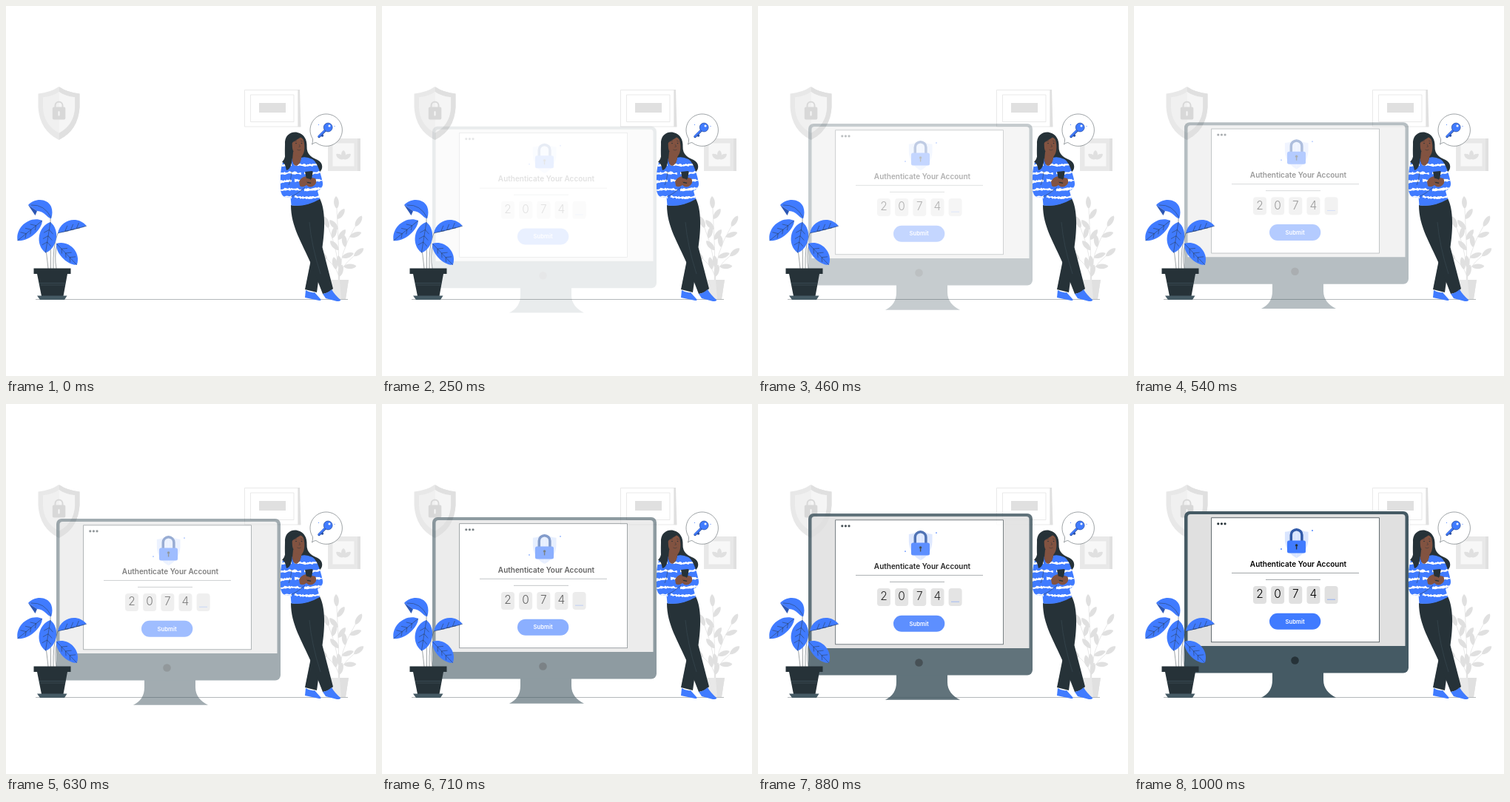
An HTML page that plays this animation: 500 px wide and 500 px high, repeating every 1040 ms.

```html
<!DOCTYPE html>
<html lang="en">
<head>
<meta charset="utf-8">
<title>Sign-in scene</title>
<style>
html, body { margin: 0; width: 100%; height: 100%; overflow: hidden; background: #fff; }
svg { display: block; width: 100%; height: 100%; }
text { font-family: Inter, "Open Sans", sans-serif; font-weight: 600; text-anchor: middle; }
.blue { fill: #407bff; }
.dark { fill: #263238; }
.slate { fill: #455a64; }
.skin { fill: #825341; }
.line { fill: none; stroke: #263238; stroke-width: .45; }
.grey { fill: #e0e0e0; }
.mist { fill: #e8e8e8; }
.pale { fill: none; stroke: #e0e0e0; stroke-width: .7; }
.dots { fill: none; stroke-linecap: round; }
</style>
</head>
<body>
<svg viewBox="0 0 500 500">
  <defs>
    <path id="half" d="M0 0Q12 8 28 9.500V28Q26 59 0 72Z"/>
    <g id="shield"><use href="#half"/><use href="#half" transform="scale(-1 1)"/></g>
    <path id="sweater" d="M377 208C370 214 371 232 371 247Q371 256 378 259L384.500 258L385.500 269.500Q405 272 424 261L421 250Q429 246 428 239C426 228 421 211 414 207Q405 203 399 205Q397 216 391 216Q387 213 387 206Z"/>
    <clipPath id="knit"><use href="#sweater"/></clipPath>
  </defs>

  <!-- wall shield -->
  <g transform="translate(71.500 109)">
    <use href="#shield" class="mist"/>
    <use href="#half" class="grey"/>
    <g transform="translate(0 7) scale(.77)">
      <use href="#shield" fill="#f0f0f0"/>
      <use href="#half" fill="#f5f5f5"/>
    </g>
    <path d="M-5 29V25.500a5 5 0 0 1 10 0V29" fill="none" stroke="#d8d8d8" stroke-width="2"/>
    <rect x="-8.700" y="27.500" width="17.500" height="17" rx="2" fill="#d8d8d8"/>
    <path d="M0 34V38.500" class="dots" stroke="#f5f5f5" stroke-width="2"/>
  </g>

  <!-- wall frames -->
  <path class="pale" d="M322.500 113.500H395V163H322.500ZM330.500 120H389V156.500H330.500Z"/>
  <path class="grey" d="M394.500 113H397L398.500 163.500H394.500ZM342 131H378V144H342Z"/>
  <path class="mist" d="M435 179H476V223H435Z"/>
  <path class="grey" d="M475 179H479V223H475Z"/>
  <path fill="#f7f7f7" d="M441.500 185.500H470.500V216.500H441.500Z"/>
  <g id="emblem" class="grey"></g>

  <!-- pale plant -->
  <g id="palePlant" class="grey"></g>
  <path class="mist" d="M437 370H463L459 396H441Z"/>
  <path class="grey" d="M451 370H463L459 396H453Z"/>

  <path d="M40 396.500H462" stroke="#263238" stroke-width=".35"/>

  <!-- computer -->
  <g id="computer">
    <path class="slate" d="M187 360H256V373C256 384 263 392 273 396.800H172C182 392 187 384 187 373Z"/>
    <rect class="slate" x="68" y="145" width="303" height="218.500" rx="7"/>
    <path class="grey" d="M72.500 327V153Q72.500 149 76.500 149H362.500Q366.500 149 366.500 153V327Z"/>
    <circle class="dark" cx="217.500" cy="346.500" r="5.300"/>
    <rect x="104.700" y="153.800" width="226.800" height="168" fill="#fff" stroke="#263238" stroke-width=".7"/>
    <path d="M113.800 161.800h.01m4.600 0h.01m4.600 0h.01" class="dots" stroke="#263238" stroke-width="3.200"/>
    <use href="#shield" fill="#d9e5ff" transform="translate(219.700 167.500) scale(.565)"/>
    <path d="M212.300 186V177a7.300 7.300 0 0 1 14.600 0V186" fill="none" stroke="#315aa8" stroke-width="3.500"/>
    <rect class="blue" x="207" y="184.500" width="25" height="17" rx="2.500"/>
    <path class="dark" d="M218.900 192.500h1.400v4h-1.400z"/>
    <circle class="dark" cx="219.600" cy="191" r="1.700"/>
    <path d="M241 171h.01M199 196h.01" class="dots" stroke="#407bff" stroke-width="1.800"/>
    <text x="222" y="219.600" font-size="10">Authenticate Your Account</text>
    <path class="line" d="M132 228.400H304M178 237.400H252"/>
    <g id="code"></g>
    <path d="M261 264.200H272" stroke="#407bff" stroke-width=".5"/>
    <rect class="blue" x="183" y="282.700" width="69.300" height="22" rx="11"/>
    <text x="217.600" y="296.500" font-size="7.700" fill="#fff">Submit</text>
  </g>

  <!-- blue plant -->
  <path class="line" d="M57 355Q56 345 54.500 333M60.500 355Q60 315 60 286M64 355Q63 325 70 307M68 355Q65 338 69 321"/>
  <path class="blue" d="M30 269C38 260 55 259 61 271Q64 279 61 287.500C55 286 52 277 42 277Z"/>
  <path fill="#2c56b3" d="M30 269L42 277L39.500 283Z"/>
  <path class="line" d="M34 269Q52 268 61 286"/>
  <g id="bluePlant" class="blue"></g>
  <path class="dark" d="M37.500 354.500H87.500V362H37.500ZM42 362H83L77.500 392H48Z"/>
  <path d="M45 374.500H80.500M45.500 377H80" stroke="#455a64" stroke-width=".6"/>
  <path class="slate" d="M42 391.500H82.500L79 397H46Z"/>

  <!-- woman -->
  <path class="dark" d="M404 383L413 338L428 328L420 387Z"/>
  <path class="dark" d="M385 269Q405 272 424 260C432 276 431 303 427.500 326L442 382Q436 388 428 389L412 348C400 320 385 298 385 269Z"/>
  <path d="M410 292Q413 325 425 362" fill="none" stroke="#455a64" stroke-width=".4"/>
  <path class="blue" d="M405 384Q411 388 417 387L425 396Q427 398 423 398L404 394ZM428 389Q435 388 440 383Q444 390 452 397Q453 399 447 399L432 395Z"/>
  <path class="dark" d="M377 187C376 175 385 169 394 171C403 173 407 181 406.500 190C406 201 414 205 421 208C429 212 429 221 423 225C414 229 406 222 399 213L385 214Q384 222 381 223Q376 216 377 187Z"/>
  <use href="#sweater" class="blue"/>
  <path id="stripes" fill="#fff" clip-path="url(#knit)"/>
  <path class="line" d="M385 258Q394 254 404 245M386 223Q385 236 382 242"/>
  <path class="dark" d="M377 190Q380 204 373 211Q377 211 379 222Q387 220 387 200Z"/>
  <path class="skin" d="M388 197L387 208Q388 215 392 216Q398 214 399 205L401 198Z"/>
  <path class="skin" d="M386.500 184C389 178 398 174 402 181C404.500 190 403.500 200 399 203.500C394 205 388 199 387 192Z"/>
  <path class="dark" d="M385 189C386 182 395 181 398 177Q391 174 386 179Z"/>
  <path class="line" d="M389.500 183L393 182M398 182L401 183M396 187L397.500 190L395.500 190.500M393.500 194Q396 196 398.500 194"/>
  <path d="M392 185.500h.01m7.500 0h.01" class="dots" stroke="#263238" stroke-width="1.500"/>
  <path class="skin" d="M396 237Q399 231 406 230L418 233Q421 238 417 242Q411 247 406 242Q401 246 397 243Z"/>
  <path class="dark" d="M404 224L413.500 223Q415 223 414.500 225L412 240L407 239Z"/>
  <path class="skin" d="M404 232L411 234L412 237L407 238ZM413 233L418 235L414 239L409 238Z"/>

  <!-- speech bubble -->
  <path d="M414.500 179.500A21.700 21.700 0 1 1 419 184.500Q416 184.500 413.500 187Q415 183 414.500 179.500Z" fill="#fff" stroke="#263238" stroke-width=".45"/>
  <path d="M432.500 167L423 176.500M426 173.500l1.500 1.500" class="dots" stroke="#2b51a5" stroke-width="3.400"/>
  <path d="M432 167L423 176" class="dots" stroke="#407bff" stroke-width="2.300"/>
  <circle class="blue" cx="435.200" cy="164" r="5.900" stroke="#2b51a5" stroke-width=".8"/>
  <circle cx="437" cy="162" r="1.500" fill="#fff"/>
  <path d="M422.500 160.500h.01M444 162.500h.01" class="dots" stroke="#407bff" stroke-width="1.200"/>
</svg>
<script>
const LOOP = 1040, RISE = 1000, LEAD = 25, DROP = 20;
const $ = id => document.getElementById(id);
const range = n => [...Array(n).keys()];

// Leaf along its own axis; the two widths bulge to either side
function leaf(x, y, angle, length, left, right, veined) {
  const a = length * .2, b = length * .8;
  const vein = i => {
    const at = length * (.25 + .2 * i);
    return `M${at} 0l5 ${-left * .4}M${at} 0l5 ${right * .4}`;
  };
  const veins = veined ? `<path class="line" d="M0 0H${length}${range(3).map(vein).join('')}"/>` : '';
  return `<g transform="translate(${x} ${y}) rotate(${angle})">
    <path d="M0 0C${a} ${-left} ${b} ${-left} ${length} 0C${b} ${right} ${a} ${right} 0 0"/>${veins}</g>`;
}

// Stem bending from the pot to a tip, with leaves on alternating sides
function branch(tipX, tipY, count) {
  const rootX = 450, rootY = 370, bendY = (rootY + tipY) / 2;
  const leaves = range(count).map(i => {
    const t = 1 - i * 14 / (rootY - tipY), s = 1 - t;
    const x = rootX + (tipX - rootX) * t * t;
    const y = s * s * rootY + 2 * s * t * bendY + t * t * tipY;
    const lean = Math.atan2(tipY - bendY, tipX - rootX) * 180 / Math.PI;
    const turn = i ? (i % 2 ? 38 : -38) : 0;
    return leaf(x, y, lean + turn, 17, 4.5, 4.5);
  }).join('');
  return `<path class="pale" d="M${rootX} ${rootY}Q${rootX} ${bendY} ${tipX} ${tipY}"/>${leaves}`;
}

$('palePlant').innerHTML =
  branch(447, 274, 5) + branch(472, 298, 5) + branch(470, 338, 3) + branch(434, 342, 2) + branch(436, 300, 2);
$('emblem').innerHTML = [-145, -90, -35].map(angle => leaf(456, 207, angle, 12, 4, 4)).join('');
$('bluePlant').innerHTML =
  leaf(49, 290, 141, 43, 10, 16, true) + leaf(60, 292, 99, 42, 15, 16, true) +
  leaf(70, 307, -14, 40, 17, 1, true) + leaf(68, 321, 46, 40, 16, 10, true);

$('code').innerHTML = [...'2074 '].map((digit, i) => {
  const x = 161 + i * 24.15;
  return `<rect class="grey" x="${x}" y="246" width="18" height="24" rx="4"/>
    <text x="${x + 9}" y="262.300" font-size="15.500" style="font-weight:300">${digit}</text>`;
}).join('');

// Ragged knit rows, each broken by a gap that shifts from row to row
let seed = 7;
const random = () => (seed = seed * 16807 % 2147483647) / 2147483647;
function stripe(x, y, width) {
  const upper = [], lower = [];
  for (let dx = 0; dx <= width; dx += 1.6) {
    const mid = y + Math.sin((x + dx) / 7);
    upper.push([x + dx, mid - .5 - 2 * random()]);
    lower.unshift([x + dx, mid + .5 + 1.5 * random()]);
  }
  return `M${upper.concat(lower).join('L')}Z`;
}
$('stripes').setAttribute('d', range(5).map(row => {
  const y = 214.5 + 11 * row, gap = 386 + 13 * (row % 2);
  return stripe(370, y + 1, gap - 370) + stripe(gap + 4, y, 426 - gap);
}).join(''));

// cubic-bezier(.42, 0, 1, 1)
function easeIn(x) {
  let low = 0, high = 1;
  for (let i = 0; i < 24; i++) {
    const s = (low + high) / 2;
    if (s * (1.26 + s * (.48 - .74 * s)) < x) low = s; else high = s;
  }
  return low * low * (3 - 2 * low);
}

const start = performance.now();
function draw(now) {
  const time = Math.max(0, now - start) % LOOP;
  const shown = easeIn(Math.min(1, (time + LEAD) / RISE));
  $('computer').setAttribute('opacity', shown);
  $('computer').setAttribute('transform', `translate(0 ${DROP * (1 - shown)})`);
  requestAnimationFrame(draw);
}
draw(start);
</script>
</body>
</html>
```
